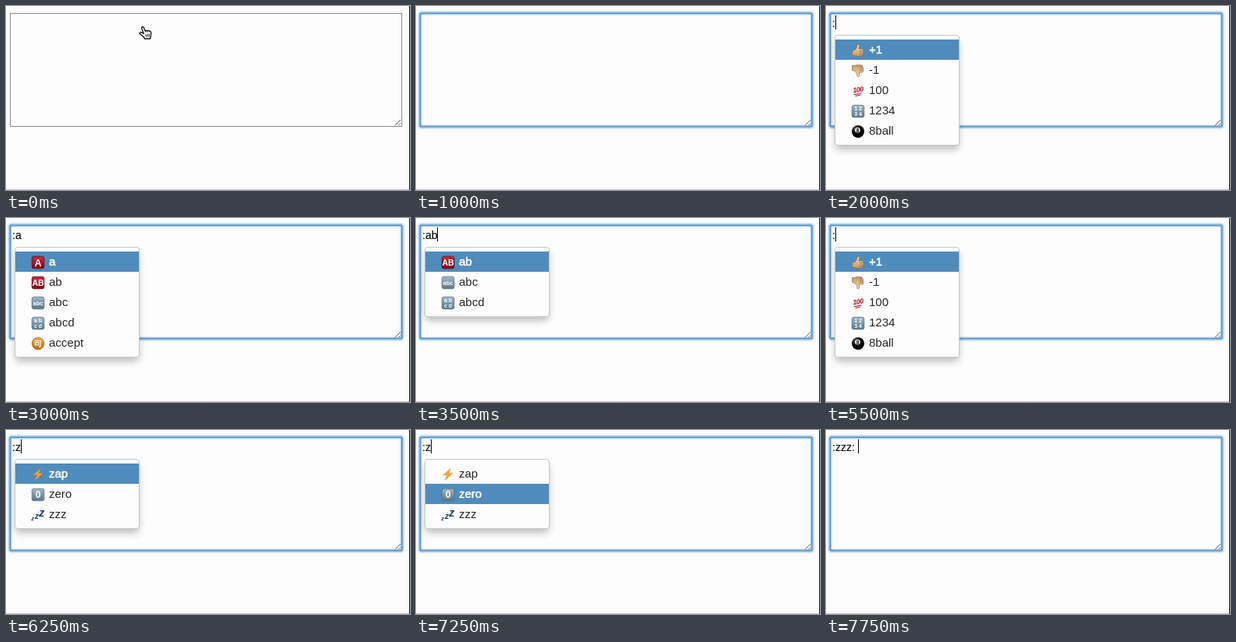
Write an HTML page that moves like this. It is 517x236 px and loops after 8 s.

```html
<!DOCTYPE html>
<html lang="en">
<head>
<meta charset="utf-8">
<title>Emoji autocomplete</title>
<style>
  html, body { margin: 0; width: 100%; height: 100%; overflow: hidden; background: #fcfcfc; }
  svg { display: block; width: 517px; height: 236px; }
  text { font-family: "Liberation Sans", Arial, sans-serif; white-space: pre; }
  .row { font-size: 15px; fill: #262626; }
  .on { fill: #fff; stroke: #fff; stroke-width: .5px; }
  #typed { font-size: 14px; fill: #111; stroke: #111; stroke-width: .2px; }
  .glyph { font-weight: bold; text-anchor: middle; fill: #fff; }
</style>
</head>
<body>
<svg viewBox="0 0 517 236">
  <defs>
    <linearGradient id="red" x2="0" y2="1"><stop stop-color="#c0313b"/><stop offset="1" stop-color="#850010"/></linearGradient>
    <linearGradient id="steel" x2="0" y2="1"><stop stop-color="#a3b8c6"/><stop offset="1" stop-color="#587689"/></linearGradient>
    <linearGradient id="gold" x2="0" y2="1"><stop stop-color="#efb04c"/><stop offset="1" stop-color="#b96513"/></linearGradient>
    <linearGradient id="skin" x2="0" y2="1"><stop stop-color="#f8dfb5"/><stop offset="1" stop-color="#c59762"/></linearGradient>
    <radialGradient id="ball" cx=".35" cy=".3"><stop stop-color="#777"/><stop offset=".55" stop-color="#161616"/><stop offset="1" stop-color="#000"/></radialGradient>
    <filter id="glow" x="-5%" y="-10%" width="110%" height="120%"><feGaussianBlur stdDeviation="1"/></filter>
    <filter id="shade" x="-20%" y="-20%" width="140%" height="150%"><feGaussianBlur stdDeviation="5"/></filter>
  </defs>
  <rect width="517" height="236" fill="#fcfcfc"/>
  <path d="M0 235.5H517" stroke="#c4c4c4"/>
  <path d="M516.5 0V236" stroke="#111"/>
  <rect x="5.5" y="9.5" width="501" height="145" fill="#fdfdfd" stroke="#8d8a9c"/>
  <path d="M497.5 153.5L505 146M502 153.5L505 150.5" stroke="#666" fill="none"/>
  <g id="ring" fill="none">
    <rect x="5" y="9" width="502" height="146" rx="1.5" stroke="#76aee0" stroke-width="3" filter="url(#glow)"/>
    <rect x="5.5" y="9.5" width="501" height="145" rx="1" stroke="#5b93c4" stroke-width="1.5"/>
  </g>
  <text id="typed" x="8" y="27"></text>
  <path id="caret" d="M0 12V30" stroke="#000"/>
  <g id="menu"></g>
  <g id="hand" transform="translate(170 25)" fill="#fff" stroke="#111" stroke-width="1.3" stroke-linejoin="round" stroke-linecap="round">
    <path d="M6.2 10.5L3.7 4C3 2 5.3 .8 6.3 2.7L8.7 8C8.4 6.3 10.7 5.8 11.3 7.5C11.5 6.2 13.3 6.1 13.7 7.7C14.4 7 15.5 7.4 15.6 8.9L15.5 12.6L14.4 17H7.6C6.8 14.6 4.6 13.1 1.6 11.1C.2 9.6 1.6 8.2 3.2 8.9Z"/>
    <path d="M9 11.5L9.6 14.5M11.2 11.2L11.6 14.3M13.3 11.2V14.2" stroke-width=".9"/>
  </g>
</svg>
<script>
const LOOP = 8000, BLINK = 500;
const el = id => document.getElementById(id);

// Icons live in a 17 x 17 box.
const glyph = (s, x, y, size) => `<text class="glyph" x="${x}" y="${y}" style="font-size:${size}px">${s}</text>`;
const tile = (fill, edge, inner) =>
  `<rect x=".7" y=".7" width="15.6" height="15.6" rx="2.5" fill="url(#${fill})" stroke="${edge}" stroke-width=".8"/>${inner}`;
const red = inner => tile('red', '#6d0a14', inner);
const steel = inner => tile('steel', '#587181', inner);
const pair = (a, b, size) => glyph(a, 8.5, 7.8, size) + glyph(b, 8.5, 14.6, size);
const thumb = `<path d="M1 9L4.3 8C6.6 6.5 7.3 4 7.5 1.6C8 .2 10.2 .6 10.2 2.8L9.7 6.5H14.2C15.8 6.7 15.8 8.6 14.7 9C16 9.4 15.8 11.2 14.6 11.4C15.4 12 15 13.5 13.9 13.7C14.4 15 13.5 15.8 12.3 15.8H6.2L4 15H1Z" fill="url(#skin)" stroke="#94683d" stroke-width=".7"/>
  <path d="M10.3 9H14.3M10.3 11.4H14.1M10.2 13.7H13.6" stroke="#94683d" stroke-width=".7"/>`;
const zed = (x, y, size) =>
  `<text x="${x}" y="${y}" fill="#1d4076" font-weight="bold" font-style="italic" style="font-size:${size}px">z</text>`;

const ICONS = {
  '+1': thumb,
  '-1': `<g transform="rotate(180 8.5 8.5) translate(17 0) scale(-1 1)">${thumb}</g>`,
  '100': `<g transform="rotate(-8 8 8)"><text x="8.5" y="10" text-anchor="middle" font-weight="bold" font-style="italic" fill="#c00e27" style="font-size:9px;letter-spacing:-.6px">100</text></g>
    <path d="M3 13.2L13 11.2M5 15L11.5 13.5" stroke="#c00e27" stroke-width="1.1"/>`,
  '1234': steel(pair('1 2', '3 4', 7)),
  '8ball': `<circle cx="8.5" cy="8.5" r="8" fill="url(#ball)"/><circle cx="8" cy="6.8" r="3.3" fill="#f4f4f4"/>
    <text x="8" y="9.2" text-anchor="middle" font-weight="bold" style="font-size:6.5px">8</text>`,
  a: red(glyph('A', 8.5, 13, 12.5)),
  ab: red(glyph('AB', 8.5, 12.8, 10.5)),
  abc: steel(glyph('abc', 8.5, 11, 7.5)),
  abcd: steel(pair('a b', 'c d', 7)),
  accept: `<circle cx="8.5" cy="8.5" r="7.8" fill="url(#gold)" stroke="#a65c18" stroke-width=".7"/>
    <path d="M4 5H13M11.5 5V12.7H9.5M5 7.2H9V10.5H5Z" fill="none" stroke="#fff" stroke-width="1.2"/>`,
  zap: `<path d="M11.8 1L2.2 9.4L7.4 9.1L4.6 16L14.5 6.9L9.2 7.3Z" fill="#f4a52c" stroke="#d98320" stroke-width=".5"/>`,
  zero: steel(glyph('0', 8.5, 12.8, 12)),
  zzz: zed(-.3, 15.5, 7.5) + zed(4.2, 13.6, 10.5) + zed(9.6, 10.3, 14.5)
};

const LISTS = {
  ':': ['+1', '-1', '100', '1234', '8ball'],
  ':a': ['a', 'ab', 'abc', 'abcd', 'accept'],
  ':ab': ['ab', 'abc', 'abcd'],
  ':z': ['zap', 'zero', 'zzz']
};

// [time, text, selected row, key resets the caret blink]
const STEPS = [
  [500, '', 0, 1],
  [1750, ':', 0, 1],
  [2500, ':a', 0, 1],
  [3250, ':ab', 0, 1],
  [5000, ':a', 0, 1],
  [5250, ':', 0, 1],
  [6000, ':z', 0, 1],
  [7250, ':z', 1, 0],
  [7500, ':z', 2, 0],
  [7750, ':zzz: ', 0, 1]
];

function row(name, i, picked) {
  const top = 43 + 26 * i, on = i === picked;
  return (on ? `<rect x="12" y="${top}" width="158" height="26" fill="#4f8cbd"/>` : '') +
    `<g transform="translate(32.5 ${top + 5.5})">${ICONS[name]}</g>` +
    `<text class="row${on ? ' on' : ''}" x="55" y="${top + 18}">${name}</text>`;
}

function menu(text, picked) {
  const list = LISTS[text];
  if (!list) return '';
  const h = 26 * list.length + 11;
  return `<rect x="12" y="44" width="158" height="${h - 1}" rx="4" fill="#000" opacity=".24" filter="url(#shade)"/>
    <rect x="11.5" y="37.5" width="159" height="${h}" rx="3.5" fill="#fdfdfd" stroke="#c6c6c6"/>` +
    list.map((name, i) => row(name, i, picked)).join('');
}

let shown = null;
function draw(t) {
  const past = STEPS.filter(s => s[0] <= t);
  const [, text, picked] = past[past.length - 1] || [0, '', 0];
  const key = past.filter(s => s[3]).pop();
  const lit = key && Math.floor((t - key[0]) / BLINK) % 2 === 0;

  el('hand').style.display = key ? 'none' : '';
  el('ring').style.display = key ? '' : 'none';
  el('ring').setAttribute('opacity', t < 750 ? .7 : 1);
  el('caret').style.display = lit ? '' : 'none';

  const state = text + picked;
  if (state === shown) return;
  shown = state;
  el('typed').textContent = text;
  const width = text ? el('typed').getComputedTextLength() : 0;
  el('caret').setAttribute('transform', `translate(${Math.round(8 + width) + .5} 0)`);
  el('menu').innerHTML = menu(text, picked);
}

const start = performance.now();
function tick() {
  draw((performance.now() - start) % LOOP);
  requestAnimationFrame(tick);
}
tick();
</script>
</body>
</html>
```
